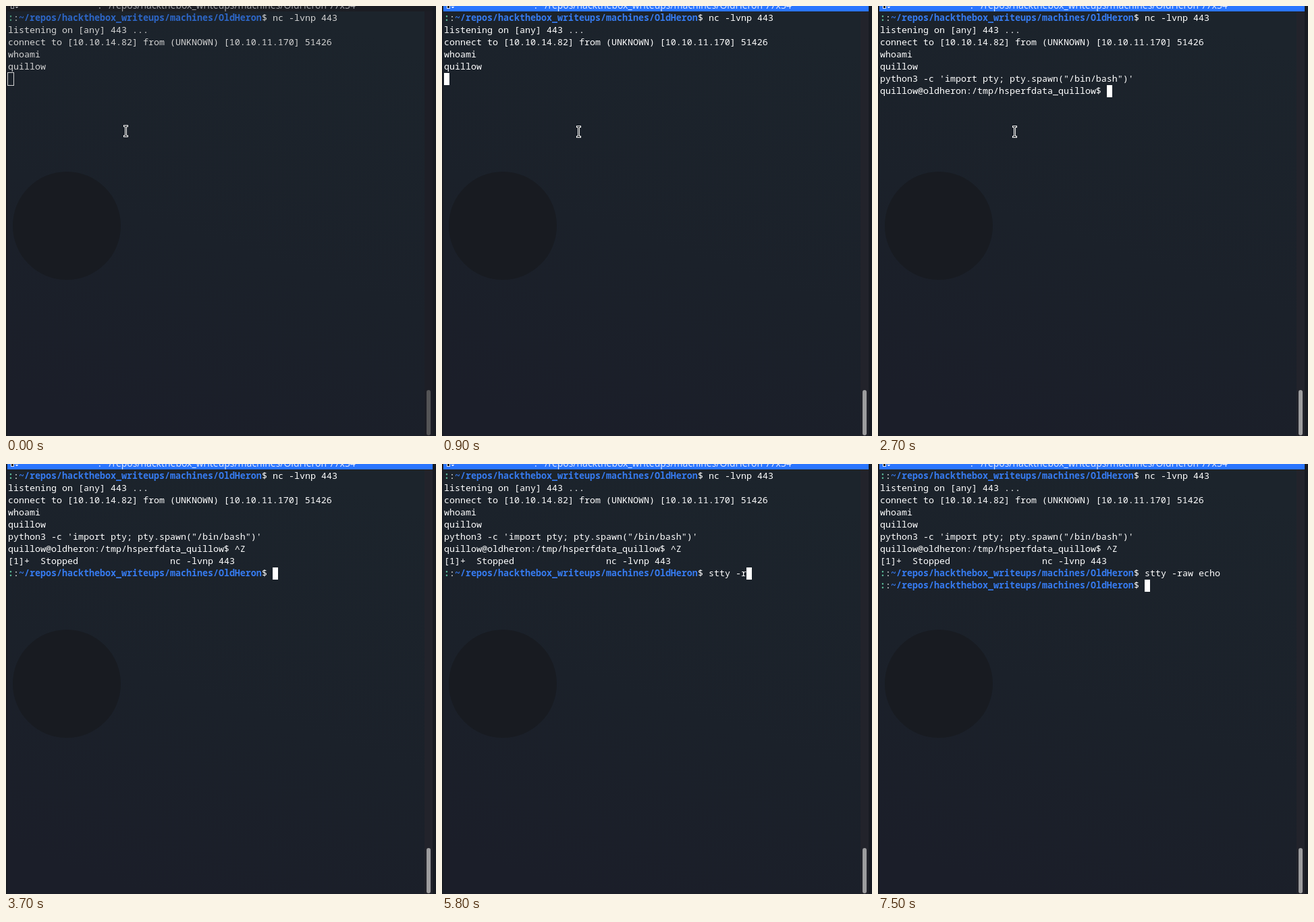
An HTML page with a canvas for the animation above (8 s loop, 637x636 px).

```html
<!DOCTYPE html>
<html lang="en">
<head>
<meta charset="utf-8">
<title>Terminal</title>
<style>
  html, body { margin: 0; width: 100%; height: 100%; overflow: hidden; background: #1b212a; }
  canvas { display: block; }
</style>
</head>
<body>
<canvas id="stage" width="637" height="636"></canvas>
<script>
const ctx = document.getElementById('stage').getContext('2d');
const LOOP = 8000, CELL = 8, ROW = 18, LEFT = 3, TOP = 9;
const MONO = '13.3333px "Noto Sans Mono", monospace';
const PATH = '~/repos/hackthebox_writeups/machines/OldHeron';
const COMMAND = 'stty -raw echo';
const KEY_TIMES = [4600, 4800, 5000, 5100, 5200, 5600, 5800,
                   6000, 6100, 6300, 6400, 6600, 6700, 6800];
const PROMPT_LENGTH = PATH.length + 4;
const SHELL = 'quillow@oldheron:/tmp/hsperfdata_quillow$ ';

const FOCUSED = { text: '#ffffff', path: '#367bf0', colon: '#5ebd9b', bar: '#2a75ff', title: '#dfe8ff', track: '#22232b' };
const BLURRED = { text: '#d2d2d2', path: '#2d66c6', colon: '#4b977c', bar: '#1b1d23', title: '#a0a1a5', track: '#1d1e26' };

const between = (t, start, end) => t >= start && t < end;

function rect(color, x, y, w, h) {
  ctx.fillStyle = color;
  ctx.fillRect(x, y, w, h);
}

function write(text, row, column, color, weight = 500) {
  ctx.font = `${weight} ${MONO}`;
  ctx.fillStyle = color;
  ctx.fillText(text, LEFT + column * CELL, TOP + row * ROW + 13);
}

function prompt(row, command, colors) {
  write(':', row, 0, colors.colon, 700);
  write(':', row, 1, colors.text);
  write(PATH, row, 2, colors.path, 700);
  write('$ ' + command, row, PATH.length + 2, colors.text);
}

function background(colors) {
  const shade = ctx.createLinearGradient(420, 0, 200, 636);
  shade.addColorStop(0, '#1c242c');
  shade.addColorStop(0.55, '#1b212a');
  shade.addColorStop(1, '#1b1e29');
  rect(shade, 0, 0, 637, 636);
  ctx.fillStyle = '#181b21';
  ctx.beginPath();
  ctx.arc(90, 325, 80, 0, 2 * Math.PI);
  ctx.fill();
  rect('#171a21', 0, 0, 2, 636);
  rect(colors.track, 620, 8, 12, 628);
  rect('#181b22', 632, 0, 5, 636);
}

function titleBar(colors) {
  rect(colors.bar, 2, 0, 630, 8);
  ctx.font = '13.9px "Noto Sans", sans-serif';
  ctx.fillStyle = colors.title;
  ctx.fillText(`: ${PATH} 77x34`, 137, 4);
  rect(colors.title, 7, 0, 5, 4);
  rect('#1d1f27', 8, 0, 3, 3);
  rect(colors.title, 14, 1, 4, 1);
  rect(colors.title, 15, 2, 2, 1);
}

function scrollThumb(t) {
  const fade = Math.min(1, Math.max(0, (Math.floor(t / 100) - 6) / 3));
  const level = 84 + 72 * fade;
  ctx.fillStyle = `rgb(${level}, ${level}, ${level + 2})`;
  ctx.beginPath();
  ctx.roundRect(623, 568, 6, 67, 3);
  ctx.fill();
}

function pointer(x, y) {
  const top = y - 8, bottom = y + 7;
  ctx.lineCap = 'square';
  for (const [color, width] of [['#ffffff', 3], ['#11151a', 1]]) {
    ctx.strokeStyle = color;
    ctx.lineWidth = width;
    ctx.beginPath();
    for (const end of [top, bottom]) {
      ctx.moveTo(x - 2, end);
      ctx.lineTo(x + 2, end);
    }
    ctx.moveTo(x, top);
    ctx.lineTo(x, bottom);
    ctx.stroke();
  }
}

function cursorCell(t, typed) {
  if (t < 1600) return [5, 0];
  if (t < 1800) return [6, 0];
  if (t < 3700) return [6, SHELL.length];
  if (t < 7500) return [8, PROMPT_LENGTH + typed];
  return [9, PROMPT_LENGTH];
}

function cursor(t, typed) {
  if (between(t, 2100, 2700) || between(t, 4300, 4600) || between(t, 7400, 7500)) return;
  const [row, column] = cursorCell(t, typed);
  const x = LEFT + column * CELL, y = TOP + row * ROW;
  if (t >= 600) return rect('#ffffff', x, y, CELL, ROW);
  ctx.strokeStyle = BLURRED.text;
  ctx.lineWidth = 1;
  ctx.strokeRect(x - 0.5, y - 0.5, CELL + 1, ROW + 1);
}

function draw(t) {
  const colors = t < 600 ? BLURRED : FOCUSED;
  const typed = KEY_TIMES.filter(time => time <= t).length;
  background(colors);
  titleBar(colors);
  scrollThumb(t);

  prompt(0, 'nc -lvnp 443', colors);
  ['listening on [any] 443 ...',
   'connect to [10.10.14.82] from (UNKNOWN) [10.10.11.170] 51426',
   'whoami',
   'quillow'].forEach((line, i) => write(line, i + 1, 0, colors.text));
  if (t >= 1600) write(`python3 -c 'import pty; pty.spawn("/bin/bash")'`, 5, 0, colors.text);
  if (t >= 1800) write(SHELL + (t >= 3700 ? '^Z' : ''), 6, 0, colors.text);
  if (t >= 3700) {
    write('[1]+  Stopped', 7, 0, colors.text);
    write('nc -lvnp 443', 7, 30, colors.text);
    prompt(8, COMMAND.slice(0, typed), colors);
  }
  if (t >= 7500) prompt(9, '', colors);

  cursor(t, typed);
  if (t < 500) pointer(177.5, 185.5);
  else if (t < 3700) pointer(202.5, 186.5);
}

const start = performance.now();
function tick() {
  draw((performance.now() - start) % LOOP);
  requestAnimationFrame(tick);
}
tick();
</script>
</body>
</html>
```
